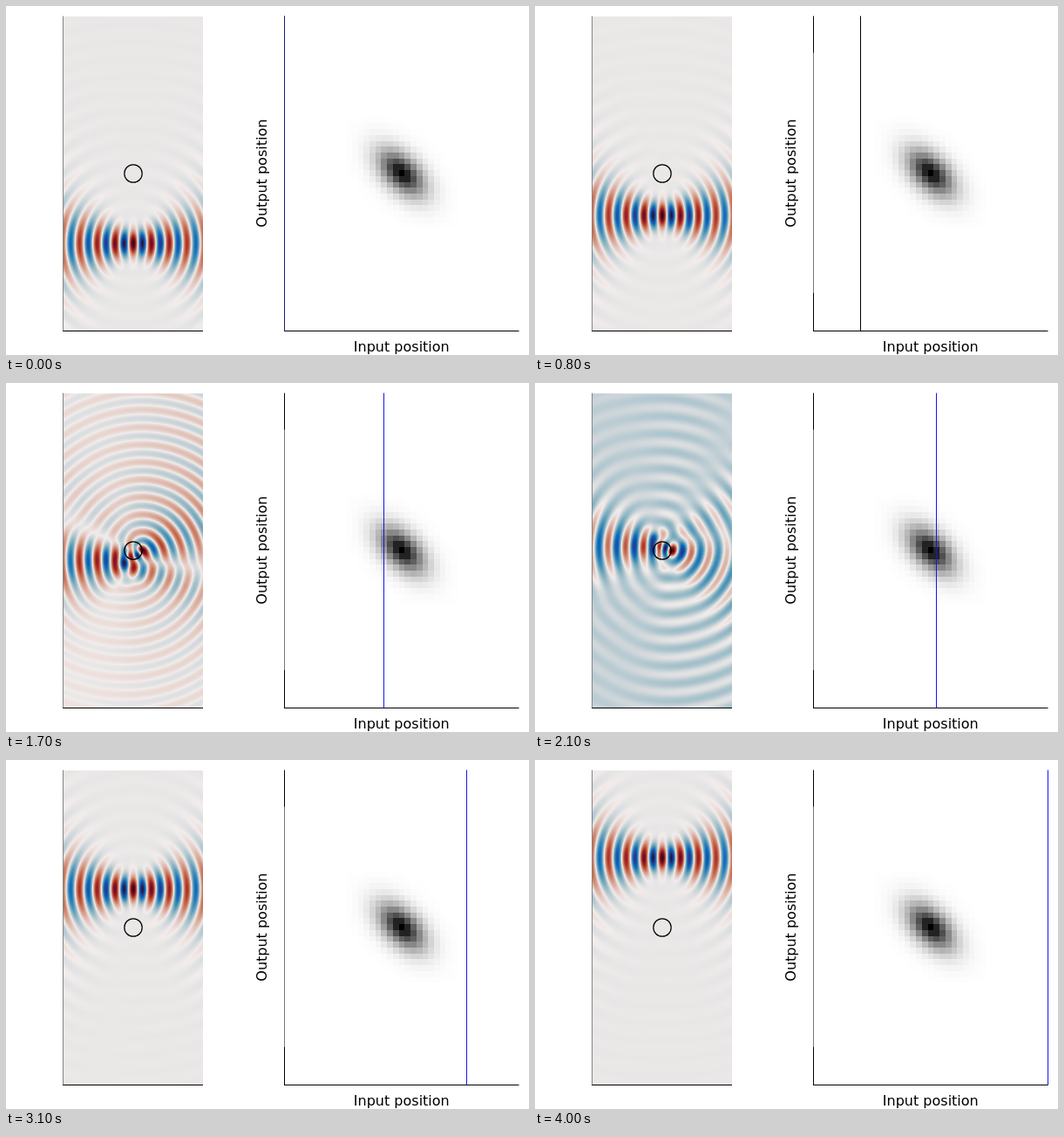
Animation, 600 px wide and 400 px high, one loop 4.1 s. Source, as an HTML page with a canvas:

```html
<!DOCTYPE html>
<html lang="en">
<head>
<meta charset="utf-8">
<title>Beam scanning across a cylinder</title>
<style>
  html, body { margin: 0; width: 100%; height: 100%; overflow: hidden; background: #fff; }
  canvas, svg { position: absolute; left: 0; top: 0; width: 600px; height: 400px; }
  text { font: 16px "DejaVu Sans", sans-serif; text-anchor: middle; fill: #000; }
</style>
</head>
<body>
<canvas id="stage" width="600" height="400"></canvas>
<svg viewBox="0 0 600 400" fill="none" stroke="#000">
  <path d="M65.5 11.5V372" stroke="#858585"/>
  <path d="M65 372.5H226"/>
  <circle cx="146" cy="192" r="10.2" stroke-width="1.2"/>
  <path d="M319.5 53V330" stroke="#777"/>
  <path d="M319.5 11.5V53.5M319.5 329V372.5M319 372.5H588.5"/>
  <path id="scan" d="M0 11.5V372.5"/>
  <g stroke="none">
    <text x="453.8" y="396">Input position</text>
    <text transform="translate(298.5 191.7) rotate(-90)">Output position</text>
  </g>
</svg>
<script>
const STEPS = 41, STEP_MS = 100;
const W = 160, H = 360, LEFT = 66, TOP = 12, CX = 146, CY = 192;
const K = 2 * Math.PI / 20;          // wavelength of 20 px
const RADIUS = 10, INDEX = 1.5;      // scattering cylinder
const SPREAD = 4.8;                  // angular width of the beam
const ORDERS = 8, FINE = 8;          // multipoles, radial samples per px
const ctx = document.getElementById('stage').getContext('2d');
const scan = document.getElementById('scan');

// Midpoint rule
function integrate(f, end, n) {
  let sum = 0;
  for (let i = 0; i < n; i++) sum += f((i + 0.5) * end / n);
  return sum * end / n;
}

function besselJ(x) {
  return Array.from({ length: ORDERS + 1 }, (_, n) =>
    integrate(t => Math.cos(n * t - x * Math.sin(t)), Math.PI, 120) / Math.PI);
}

function besselY(x) {
  const start = n => (
    integrate(t => Math.sin(x * Math.sin(t) - n * t), Math.PI, 300) -
    integrate(t => (Math.exp(n * t) + (n ? -1 : 1) * Math.exp(-n * t)) * Math.exp(-x * Math.sinh(t)), 4, 150)
  ) / Math.PI;
  const y = [start(0), start(1)];
  for (let n = 1; n < ORDERS; n++) y.push(2 * n / x * y[n] - y[n - 1]);
  return y;
}

const slope = (f, n, x) => n / x * f[n] - f[n + 1];
const times = (a, b) => [a[0] * b[0] - a[1] * b[1], a[0] * b[1] + a[1] * b[0]];

// Scattering and inner coefficients of the cylinder
const size = K * RADIUS, inner = size * INDEX;
const jOut = besselJ(size), yOut = besselY(size), jIn = besselJ(inner);
const coeffs = Array.from({ length: ORDERS }, (_, n) => {
  const d = INDEX * slope(jIn, n, inner);
  const p = d * jOut[n] - jIn[n] * slope(jOut, n, size);
  const q = d * yOut[n] - jIn[n] * slope(yOut, n, size);
  const norm = p * p + q * q;
  const b = [-p * p / norm, p * q / norm];
  const s = times(b, [jOut[n], yOut[n]]);
  return { b, c: [(jOut[n] + s[0]) / jIn[n], s[1] / jIn[n]] };
});

// Radial functions, each multiplied by i^n
const EDGE = RADIUS * FINE, RADII = 200 * FINE;
const radial = new Float32Array(RADII * ORDERS * 2);
const POWERS = [[1, 0], [0, 1], [-1, 0], [0, -1]];
for (let i = 0; i < RADII; i++) {
  const inside = i < EDGE, x = K * i / FINE * (inside ? INDEX : 1);
  const j = besselJ(x), y = inside ? null : besselY(x);
  for (let n = 0; n < ORDERS; n++) {
    const { b, c } = coeffs[n];
    const f = inside ? times(c, [j[n], 0]) : times(b, [j[n], y[n]]);
    radial.set(times(POWERS[n % 4], f), (i * ORDERS + n) * 2);
  }
}

// Plane-wave spectrum of the focused beam
const WAVES = 240;
const waves = Array.from({ length: WAVES }, (_, i) => {
  const angle = (i + 0.5) / WAVES * Math.PI / 2;
  return { angle, sin: Math.sin(angle), cos: Math.cos(angle), amp: Math.exp(-SPREAD * Math.sin(angle) ** 2) };
});
const total = waves.reduce((sum, w) => sum + w.amp, 0);
waves.forEach(w => w.amp /= total);

// One quadrant of the free beam
const QW = W / 2, QH = 264;
const beam = new Float32Array(QW * QH);
for (const w of waves) {
  const across = Float32Array.from({ length: QW }, (_, x) => Math.cos(K * (x + 0.5) * w.cos));
  for (let y = 0; y < QH; y++) {
    const a = w.amp * Math.cos(K * (y + 0.5) * w.sin);
    for (let x = 0; x < QW; x++) beam[y * QW + x] += a * across[x];
  }
}

const STOPS = [
  [23, 28, 66], [41, 58, 143], [11, 102, 189], [69, 144, 185], [142, 181, 194], [210, 216, 219],
  [241, 236, 235],
  [230, 210, 204], [213, 157, 137], [196, 101, 72], [172, 43, 36], [120, 14, 40], [60, 9, 17]
];
const stopAt = i => i < 6 ? i / 11 : i === 6 ? 0.5 : (i - 1) / 11;
const palette = Array.from({ length: 512 }, (_, p) => {
  const t = p / 511;
  let i = 0;
  while (i < 11 && t > stopAt(i + 1)) i++;
  const f = (t - stopAt(i)) / (stopAt(i + 1) - stopAt(i));
  return STOPS[i].map((v, c) => v + (STOPS[i + 1][c] - v) * f);
});

function fieldImage(step) {
  const offset = 80 - 4 * step;
  const weight = n => waves.reduce((sum, w) => sum + w.amp * Math.cos(K * offset * w.sin + n * w.angle), 0);
  const even = [weight(0)], odd = [0];
  for (let n = 1; n < ORDERS; n++) {
    const a = weight(n), b = weight(-n);
    even.push(a + b);
    odd.push(a - b);
  }
  const field = new Float32Array(W * H);
  let min = Infinity, max = -Infinity;
  for (let py = 0; py < H; py++) {
    const y = TOP + py + 0.5 - CY;
    const row = Math.floor(Math.abs(y - offset)) * QW;
    for (let px = 0; px < W; px++) {
      const x = LEFT + px + 0.5 - CX, r = Math.hypot(x, y);
      const ri = Math.round(r * FINE), c1 = x / r, s1 = y / r;
      let v = ri < EDGE ? 0 : beam[row + Math.floor(Math.abs(x))];
      let c = 1, s = 0, at = ri * ORDERS * 2;
      for (let n = 0; n < ORDERS; n++, at += 2) {
        v += radial[at] * even[n] * c - radial[at + 1] * odd[n] * s;
        const next = c * c1 - s * s1;
        s = s * c1 + c * s1;
        c = next;
      }
      field[py * W + px] = v;
      if (v < min) min = v;
      if (v > max) max = v;
    }
  }
  const image = new ImageData(W, H);
  field.forEach((v, i) => {
    const [r, g, b] = palette[Math.round((v - min) / (max - min) * 511)];
    image.data.set([r, g, b, 255], i * 4);
  });
  return image;
}

// Input/output matrix
function drawMatrix() {
  const cell = 6.72, edge = (mid, i) => Math.round(mid + (i - 0.5) * cell);
  for (let j = -9; j <= 9; j++) {
    for (let i = -9; i <= 9; i++) {
      const q = (i + j) ** 2 / 2 / 4.4 ** 2 + (i - j) ** 2 / 2 / 2.5 ** 2;
      const g = Math.round(255 * (1 - Math.exp(-(q ** 0.85))));
      const x = edge(454, i), y = edge(191.5, j);
      ctx.fillStyle = `rgb(${g},${g},${g})`;
      ctx.fillRect(x, y, edge(454, i + 1) - x, edge(191.5, j + 1) - y);
    }
  }
}

const scanColor = step => step === 0 ? '#1a1a78' : step <= 10 ? '#000' : '#1414f0';
const images = [];
let shown = -1;

function draw() {
  const step = Math.floor(performance.now() / STEP_MS) % STEPS;
  if (step !== shown) {
    shown = step;
    images[step] = images[step] || fieldImage(step);
    ctx.putImageData(images[step], LEFT, TOP);
    scan.setAttribute('transform', `translate(${Math.floor(319.75 + 6.72 * step) + 0.5} 0)`);
    scan.setAttribute('stroke', scanColor(step));
  }
  requestAnimationFrame(draw);
}

drawMatrix();
draw();
</script>
</body>
</html>
```
